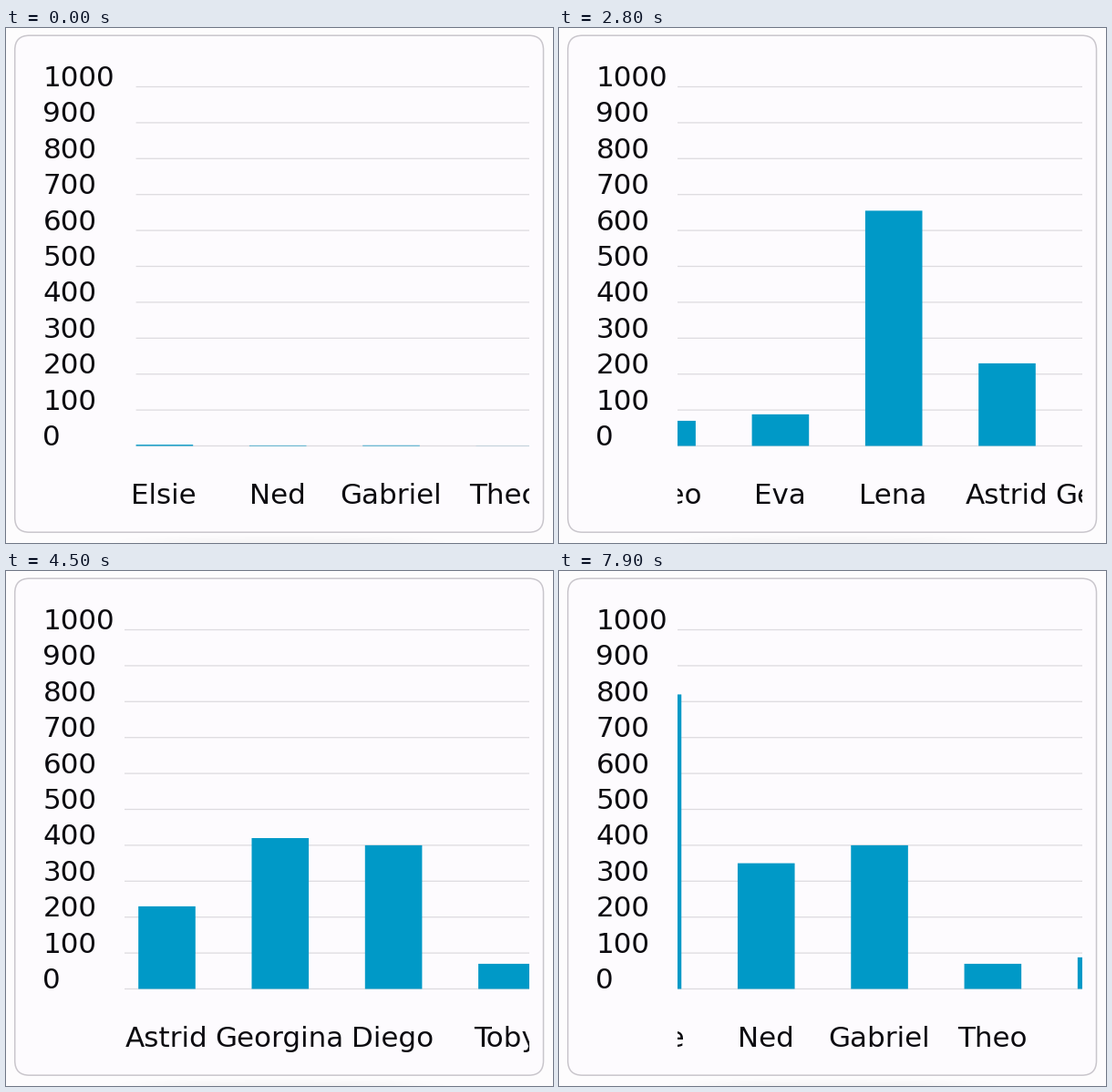
A matplotlib script that plays this animation: 600x565 px, repeating every 8000 ms.

```python
import numpy as np
import matplotlib.pyplot as plt
from matplotlib.animation import FuncAnimation
from matplotlib.patches import FancyBboxPatch, Polygon, Rectangle

W, H, DPI = 600, 565, 100
STEP, LOOP = 100, 8000
LEFT, RIGHT = 130, 574            # visible part of the plot
BASE, UNIT = 458.5, 0.394         # zero line and pixels per value
FIRST, PITCH, BAR_W = 142.6, 124.3, 62.6

INK, BLUE, INDIGO = "#0c0b10", "#0099c7", "#3f51b5"
LILAC = (0.935, 0.86, 0.985)

DATA = [("Elsie", 820), ("Ned", 350), ("Gabriel", 400), ("Theo", 70),
        ("Eva", 88), ("Lena", 655), ("Astrid", 230), ("Georgina", 420),
        ("Diego", 400), ("Toby", 70)]
PICK = 6                          # bar with the tooltip

plt.rcParams["font.family"] = "DejaVu Sans"


def pt(px):
    return px * 72 / DPI


def ease(u):
    """Cubic bezier (0.4, 0, 0.2, 1)."""
    s = np.linspace(0, 1, 400)
    x = 1.2 * s * (1 - s) ** 2 + 0.6 * s ** 2 * (1 - s) + s ** 3
    return np.interp(u, x, s * s * (3 - 2 * s))


def travel(ms):
    """Distance of a quick drag followed by a decaying fling."""
    ms = min(max(ms, 0), 2009)
    if ms < 209:
        return 137 * (ms / 209) ** 2
    return 137 + 620 * (1 - np.exp(-(ms - 209) / 473))


def scroll(t):
    return travel(t - 2291) - 1.57 * travel(t - 7391)


def growth(t):
    return float(ease((t + 50) / 1161))


def tip_alpha(t):
    return float(np.interp(t, [5700, 5900, 7200, 7400], [0, 1, 1, 0]))


fig = plt.figure(figsize=(W / DPI, H / DPI), dpi=DPI, facecolor="#fdfcfd")
ax = fig.add_axes([0, 0, 1, 1])
ax.axis("off")

# soft shadow below the card
sx, sy = np.meshgrid(np.arange(W) + 0.5, np.arange(555, H) + 0.5)
shade = np.zeros(sx.shape + (4,))
shade[..., 3] = 0.035 * np.exp(-((sx - 300) / 150) ** 4) * (sy - 555) / 10
ax.imshow(shade, extent=(0, W, H, 555), aspect="auto", zorder=0)
ax.set(xlim=(0, W), ylim=(H, 0))

ax.add_patch(FancyBboxPatch(
    (9.7, 8.2), 579.8, 545, boxstyle="round,pad=0,rounding_size=16",
    fc="#fdfbfe", ec="#c9c6cc", lw=pt(1.5), zorder=1))

window = Rectangle((LEFT, H), RIGHT - LEFT, -H, transform=ax.transData)

grid = []
for value in range(0, 1001, 100):
    y = BASE - value * UNIT
    grid += ax.plot([FIRST, RIGHT], [y, y], color="#dddbdf", lw=pt(1.25),
                    solid_capstyle="butt", snap=False, zorder=2)
    ax.text(40.5, y - 0.5, str(value), size=pt(31), color=INK, va="baseline")

bars, names = [], []
for name, value in DATA:
    bar = ax.add_patch(Rectangle((0, BASE), BAR_W, 0, fc=BLUE, lw=0,
                                 snap=False, zorder=3))
    label = ax.text(0, 522, name, size=pt(31), color=INK, ha="center",
                    va="baseline", clip_on=True)
    for part in (bar, label):
        part.set_clip_path(window)
    bars.append(bar)
    names.append(label)

tip_shapes = [
    ax.add_patch(FancyBboxPatch(
        (193, 330), 134, 75, boxstyle="round,pad=0,rounding_size=5",
        fc=LILAC, lw=0, zorder=4)),
    ax.add_patch(Polygon([(193, 352), (177, 367.5), (193, 383)],
                         fc=LILAC, lw=0, zorder=4)),
]
tip_texts = [
    ax.text(209.5, y, line, size=pt(22.5), color=INDIGO, va="baseline",
            zorder=5)
    for y, line in ((360, f"X: {DATA[PICK][0]}"), (389.5, f"Y: {DATA[PICK][1]}"))
]


def draw(i):
    t = i * STEP
    shift, grow, alpha = scroll(t), growth(t), tip_alpha(t)
    for line in grid:
        line.set_xdata([max(LEFT, FIRST - shift), RIGHT])
    for k, (_, value) in enumerate(DATA):
        x = FIRST + k * PITCH - shift
        shown = x < RIGHT + 60 and x + BAR_W > LEFT - 60
        bars[k].set_x(x)
        bars[k].set_height(-value * UNIT * grow)
        names[k].set_x(x + BAR_W / 2 - 0.7)
        bars[k].set_visible(shown)
        names[k].set_visible(shown)
    for shape in tip_shapes:
        shape.set_alpha(0.66 * alpha)
    for text in tip_texts:
        text.set_alpha(alpha)
    return bars + names + grid + tip_shapes + tip_texts


anim = FuncAnimation(fig, draw, frames=LOOP // STEP, interval=STEP,
                     repeat=True, repeat_delay=0, blit=False)
plt.show()
```
